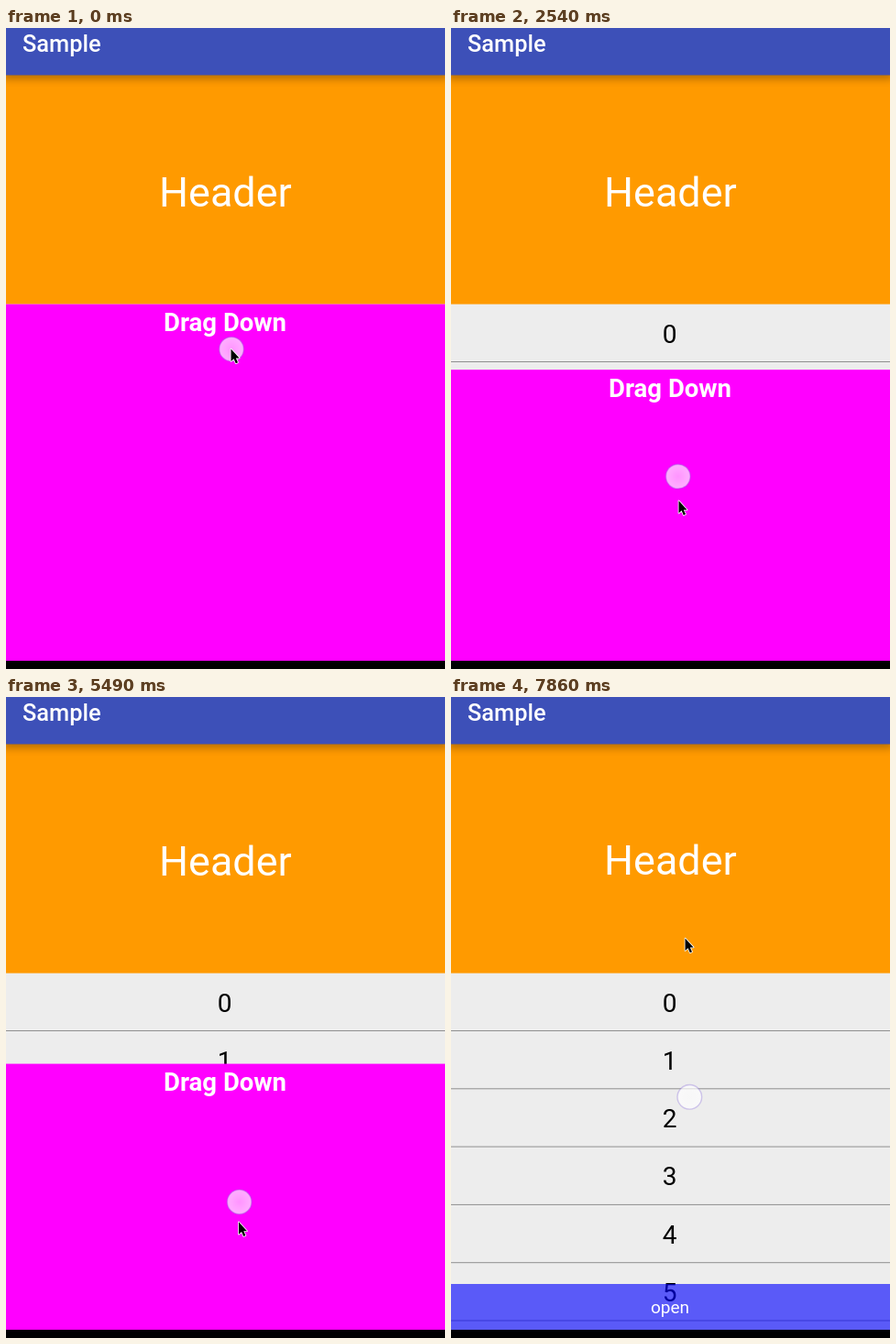
These frames come from a looping animation (479x700 px, 8000 ms). An HTML page:

```html
<!DOCTYPE html>
<html lang="en">
<head>
<meta charset="utf-8">
<title>Drag down panel</title>
<style>
  html, body { margin: 0; width: 100%; height: 100%; overflow: hidden; background: #000; }
  svg { display: block; width: 479px; height: 700px; }
  text { font-family: Roboto, "Noto Sans", sans-serif; text-anchor: middle; fill: #fff; }
  .title { font-size: 25.4px; font-weight: 500; text-anchor: start; }
  .header { font-size: 44.9px; }
  .label { font-size: 27.5px; font-weight: 700; }
  .item { font-size: 28px; fill: #000; }
  .open { font-size: 19px; }
</style>
</head>
<body>
<svg viewBox="0 0 479 700">
  <defs>
    <filter id="blur" x="-10%" y="-50%" width="120%" height="200%"><feGaussianBlur stdDeviation="4"/></filter>
    <radialGradient id="glow">
      <stop offset="0" stop-color="#fff" stop-opacity=".58"/>
      <stop offset=".9" stop-color="#fff" stop-opacity=".68"/>
      <stop offset="1" stop-color="#fff" stop-opacity=".6"/>
    </radialGradient>
    <clipPath id="screen"><rect width="479" height="691"/></clipPath>
  </defs>
  <g clip-path="url(#screen)">
    <rect width="479" height="310" fill="#ff9a00"/>
    <text class="header" id="header" x="239.4">Header</text>
    <rect x="-3" y="14" width="485" height="42" opacity=".27" filter="url(#blur)"/>
    <rect width="479" height="51.5" fill="#3d50b8"/>
    <text class="title" x="18" y="26.4">Sample</text>
    <g id="list"><rect y="301.6" width="479" height="390" fill="#ededed"/></g>
    <g id="panel">
      <rect width="479" height="400" fill="#f0f"/>
      <text class="label" x="239" y="29.4">Drag Down</text>
    </g>
    <g id="bar">
      <rect y="641" width="479" height="50" fill="#00f" fill-opacity=".62"/>
      <text class="open" x="239" y="673">open</text>
    </g>
    <circle id="touch" r="13.3" fill="url(#glow)" stroke="#8a6fd8" stroke-opacity=".36" stroke-width="1.4"/>
    <path id="cursor" d="M.5 .5V14L3.6 11.2 5.8 16.2 8 15.2 5.8 10.4H9.6Z"
      stroke="#fff" stroke-width="1.6" stroke-linejoin="round" paint-order="stroke"/>
  </g>
</svg>
<script>
const LOOP = 8000, STEP = 148, LAST = 53, OPENED = 45;
const TOP = 301.6, BOTTOM = 691, SLOP = 33, RESISTANCE = 0.53, TOUCH_LAG = 0.5;

// Turning points of the hand: [step, x, y]
const path = [
  [0, 245, 350], [3.5, 256, 552], [9, 249.5, 354], [11, 245, 321],
  [14.2, 241, 321], [20.6, 257, 606], [25, 257, 606], [28, 252, 300], [31, 255, 331],
  [33.2, 255, 331], [40.5, 252, 645], [47, 266, 700], [49, 268, 496],
  [52, 269, 496], [52.42, 260, 496], [53, 255, 263]
];
const presses = [[0, 4], [13, 22], [32, 41], [51, 53]];
const drags = [
  { from: 13, to: 22, rest: TOP, settle: 2 },
  { from: 32, to: 41, rest: BOTTOM, settle: 4 }
];

const $ = id => document.getElementById(id);
const clamp = u => Math.min(1, Math.max(0, u));
const easeOut = u => 1 - (1 - u) ** 2;
const mix = (a, b, u) => a + (b - a) * u;

function pointer(k) {
  const i = Math.max(1, path.findIndex(p => p[0] >= k));
  const [k0, x0, y0] = path[i - 1], [k1, x1, y1] = path[i];
  const u = clamp((k - k0) / (k1 - k0));
  return { x: mix(x0, x1, u), y: mix(y0, y1, easeOut(u)) };
}

function touch(k) {
  const { x, y } = pointer(k - TOUCH_LAG);
  return { x: x + 1, y: y + 0.7 };
}

function panelTop(k) {
  const d = drags.findLast(d => k >= d.from);
  if (!d) return TOP;
  const pull = touch(Math.min(k, d.to)).y - touch(d.from).y - SLOP;
  const held = TOP + RESISTANCE * Math.max(0, pull);
  return mix(held, d.rest, easeOut(clamp((k - d.to) / d.settle)));
}

function show(el, on) {
  el.setAttribute("visibility", on ? "visible" : "hidden");
}

function move(el, { x, y }) {
  el.setAttribute("transform", `translate(${x} ${y})`);
}

function add(tag, attrs, text = "") {
  const el = document.createElementNS("http://www.w3.org/2000/svg", tag);
  for (const name in attrs) el.setAttribute(name, attrs[name]);
  el.textContent = text;
  $("list").append(el);
}

for (let i = 0; i < 6; i++) {
  const y = i * 63.3;
  add("text", { class: "item", x: 238.6, y: Math.floor(344 + y) }, i);
  add("rect", { y: 364 + y, width: 479, height: 1, "fill-opacity": .4 });
}

function draw(now) {
  const k = Math.min(LAST, Math.floor((now % LOOP + 1) / STEP));
  const opened = k >= OPENED;
  move($("panel"), { x: 0, y: panelTop(k) });
  move($("touch"), touch(k));
  move($("cursor"), pointer(k));
  show($("touch"), presses.some(([down, up]) => k >= down && k <= up));
  show($("cursor"), k <= 40 || k >= 48);
  show($("bar"), opened);
  $("header").setAttribute("y", opened ? 194 : 194.6);
}

const start = performance.now();
function tick() {
  draw(performance.now() - start);
  requestAnimationFrame(tick);
}
tick();
</script>
</body>
</html>
```
